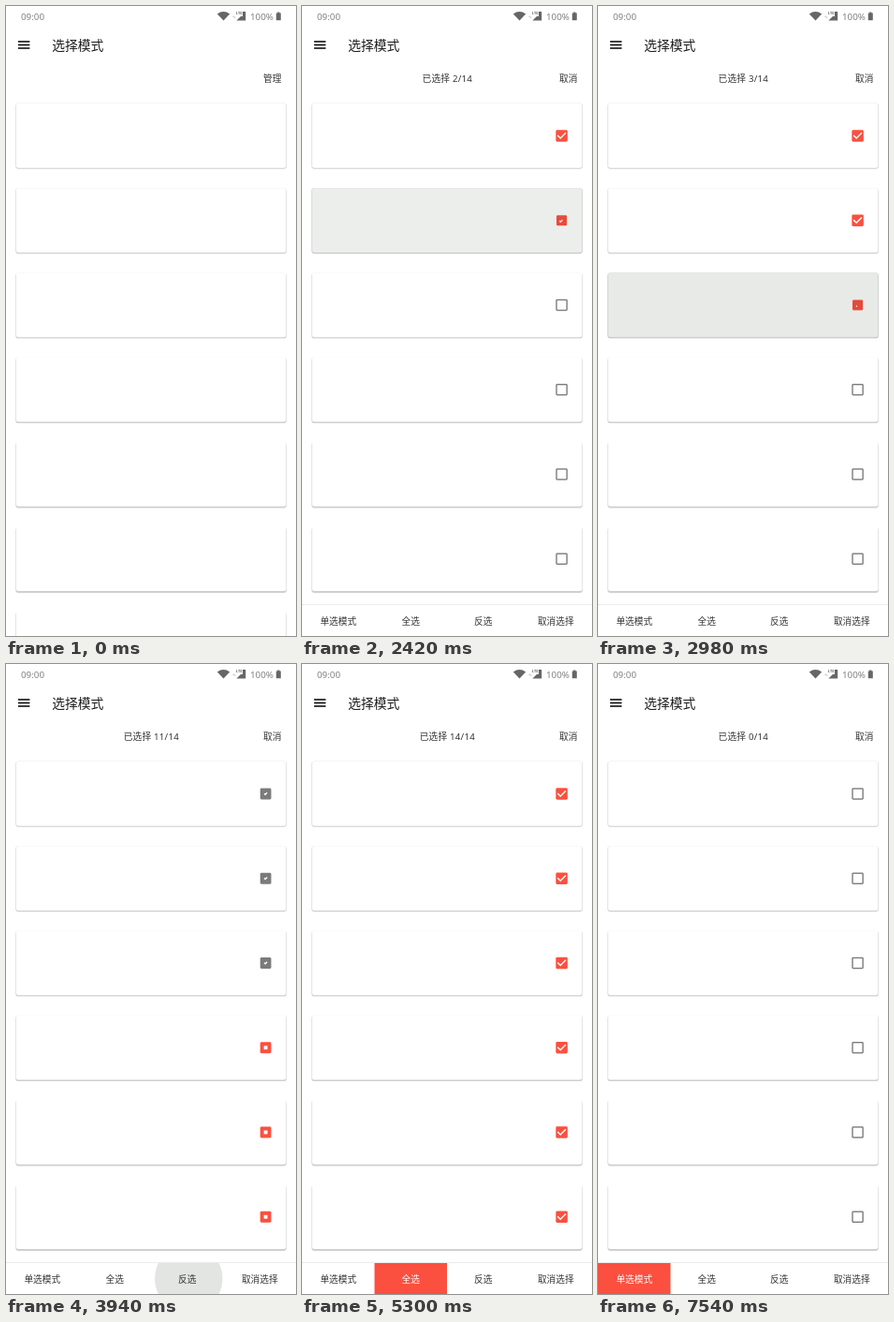
Write an HTML page that moves like this. It is 310 px wide and 672 px high and loops after 8000 ms.

```html
<!DOCTYPE html>
<html lang="zh-CN">
<head>
<meta charset="utf-8">
<title>选择模式</title>
<style>
  html, body { margin: 0; width: 100%; height: 100%; overflow: hidden; background: #fff; }
  svg { display: block; width: 310px; height: 672px; }
  text { font-family: "Noto Sans", "Noto Sans CJK SC", "Noto Sans CJK", sans-serif; font-size: 9.7px; fill: #333; }
  .mid { text-anchor: middle; }
  .status { fill: #808080; font-size: 9.8px; }
  .title { font-size: 13.8px; font-weight: 500; fill: #1c1c1c; }
  .ripple { mix-blend-mode: multiply; }
</style>
</head>
<body>
<svg id="stage" viewBox="0 0 310 672" xmlns="http://www.w3.org/2000/svg">
  <rect width="310" height="672" fill="#fff"/>
  <text class="status" x="16" y="14.6">09:00</text>
  <g fill="#666">
    <path d="M232.5 15.6L225.8 8.4Q232.5 3.6 239.2 8.4Z"/>
    <path d="M256.2 6V15.6H246.4L251 11H253V6Z"/>
    <path d="M288.8 7.6H290.2V6.6H292.4V7.6H293.8V15.2H288.8Z"/>
    <text x="245.8" y="9.4" style="font-size:4px;font-weight:700;fill:#666">LTE</text>
    <path d="M243.2 10.2l1.1 1.3h-2.2zM244.6 13l-1.1-1.3h2.2z" opacity=".5"/>
  </g>
  <text class="status" x="261" y="14.6">100%</text>
  <path d="M12.9 38H25.4M12.9 41.5H25.4M12.9 45H25.4" stroke="#000" stroke-width="1.4"/>
  <text class="title" x="49.2" y="46.8">选择模式</text>
  <text class="mid" id="action" x="284.8" y="80.6">管理</text>
  <text class="mid" id="count" x="155.3" y="80.6" letter-spacing=".2"></text>
  <g id="cards"></g>
  <g id="bar">
    <rect y="638" width="310" height="34" fill="#fff"/>
    <rect y="638" width="310" height="1" fill="#ececec"/>
  </g>
</svg>
<script>
const NS = 'http://www.w3.org/2000/svg';
const RED = '#fb503f', GREY = '#7b7b7b';
const LOOP = 8000, STEP = 80, PHASE = 20, LAG = 60;
const TOTAL = 14, PITCH = 90.25, TAB = 77.5, OPEN = 500;
const $ = id => document.getElementById(id);
const clamp = v => Math.max(0, Math.min(1, v));

function set(el, attrs) {
  for (const k in attrs) el.setAttribute(k, attrs[k]);
}
function add(parent, tag, attrs) {
  const el = document.createElementNS(NS, tag);
  set(el, attrs);
  parent.appendChild(el);
  return el;
}

// A clipped touch ripple that darkens whatever lies under it
function makeRipple(parent, id, x, y, w, h, rx, life) {
  const clip = add(parent, 'clipPath', { id });
  add(clip, 'rect', { x, y, width: w, height: h, rx });
  const dot = add(parent, 'circle', {
    class: 'ripple', cx: x + w / 2 + 1.5, cy: y + h / 2, 'clip-path': `url(#${id})`
  });
  const max = Math.hypot(w, h) / 2 + 1.5;
  return age => {
    const live = age >= 0 && age < life;
    const k = live ? 1 - (age / life) ** 2 : 0;
    set(dot, {
      r: live ? max * (1 - Math.pow(1 - clamp(age / 200), 5)) : 0,
      fill: `rgb(${255 - 28 * k},${255 - 26 * k},${255 - 29 * k})`
    });
  };
}

// One rounded card layer, grown by `grow` and moved down by `dy`
function layer(parent, y, grow, dy, fill, alpha) {
  add(parent, 'rect', {
    x: 10.9 - grow, y: y - grow + dy, width: 288.4 + 2 * grow, height: 68.6 + 2 * grow,
    rx: 2.5 + grow / 2, fill, 'fill-opacity': alpha
  });
}

function makeCard(i) {
  const y = 104.1 + PITCH * i, drop = 0.3 + 0.2 * i;
  const g = add($('cards'), 'g', {});
  layer(g, y, 0.8, drop - 0.1, '#000', 0.08);
  layer(g, y, 0.3, drop + 0.4, '#000', 0.12);
  layer(g, y, 0, 0, '#fff', 1);
  const box = add(g, 'g', {});
  const fill = add(box, 'rect', { x: -9, y: -9, width: 18, height: 18, rx: 2 });
  const hole = add(box, 'rect', { fill: '#fff' });
  const mark = add(box, 'path', {
    d: 'M-6.3 -.7L-2 3.6L6.3 -4.7', fill: 'none', stroke: '#fff',
    'stroke-width': 1.4, 'vector-effect': 'non-scaling-stroke'
  });
  const ripple = makeRipple(g, 'card' + i, 10.3, y - 0.4, 289.6, 69.6, 3, 520);

  return (shown, on, age, touch) => {
    const shrink = clamp(age / 110) - clamp((age - 320) / 160);
    const scale = 0.695 * (1 - 0.11 * shrink);
    const late = clamp((age - 190) / 280);
    const gap = on ? clamp(1 - age / 104) : late;
    const tick = on ? late : clamp(1 - age / 95);
    const off = on ? 2 * (1 - tick) : 0;
    set(box, { transform: `translate(277.6 ${y + 34.4}) scale(${scale})`, opacity: shown });
    set(fill, { fill: on ? RED : GREY });
    set(hole, { x: -7 * gap, y: -7 * gap, width: 14 * gap, height: 14 * gap });
    set(mark, {
      transform: `translate(${-off} ${off}) scale(${tick})`,
      opacity: tick > 0 ? 1 : 0
    });
    ripple(touch);
  };
}

function makeTab(label, i) {
  const x = TAB * i;
  const back = add($('bar'), 'rect', { x, y: 639, width: TAB, height: 33, fill: RED });
  const ripple = makeRipple($('bar'), 'tab' + i, x, 639, TAB, 33, 0, 460);
  const text = add($('bar'), 'text', { class: 'mid', x: x + TAB / 2, y: 659.6 });
  text.textContent = label;
  return (active, touch) => {
    set(back, { opacity: active ? 1 : 0 });
    text.style.fill = active ? '#fff' : '#333';
    ripple(touch);
  };
}

const cards = Array.from({ length: 7 }, (_, i) => makeCard(i));
const tabs = ['单选模式', '全选', '反选', '取消选择'].map(makeTab);

const pick = n => (on, i) => on || i === n;
const taps = [
  { at: 1620, card: 0, rule: pick(0) },
  { at: 2180, card: 1, rule: pick(1) },
  { at: 2820, card: 2, rule: pick(2) },
  { at: 3940, tab: 2, rule: on => !on },
  { at: 4740, tab: 1, rule: () => true },
  { at: 5940, tab: 3, rule: () => false },
  { at: 7140, tab: 0, rule: on => on }
];

function draw(ms) {
  const t = Math.floor((ms - PHASE) / STEP) * STEP + PHASE;
  const since = at => t - at + LAG;
  const items = Array.from({ length: TOTAL }, () => ({ on: false, age: 1e4 }));
  const past = taps.filter(p => p.at <= t);
  for (const p of past) {
    items.forEach((item, i) => {
      const on = p.rule(item.on, i);
      if (on !== item.on) items[i] = { on, age: since(p.at) };
    });
  }
  const touch = (kind, i) => {
    const p = past.find(q => q[kind] === i);
    return p ? since(p.at) : -1;
  };
  const shown = t < OPEN ? 0 : t < OPEN + STEP ? 0.7 : 1;

  $('action').textContent = shown ? '取消' : '管理';
  $('count').textContent = `已选择 ${items.filter(c => c.on).length}/${TOTAL}`;
  set($('count'), { opacity: shown });
  set($('bar'), { opacity: shown });
  cards.forEach((card, i) => card(shown, items[i].on, items[i].age, touch('card', i)));
  tabs.forEach((tab, i) => {
    const active = i === 0 ? t >= 7140 : i === 1 && t >= 4740 && t < 5940;
    tab(active, touch('tab', i));
  });
}

const start = performance.now();
function frame() {
  draw((performance.now() - start) % LOOP);
  requestAnimationFrame(frame);
}
draw(0);
requestAnimationFrame(frame);
</script>
</body>
</html>
```
